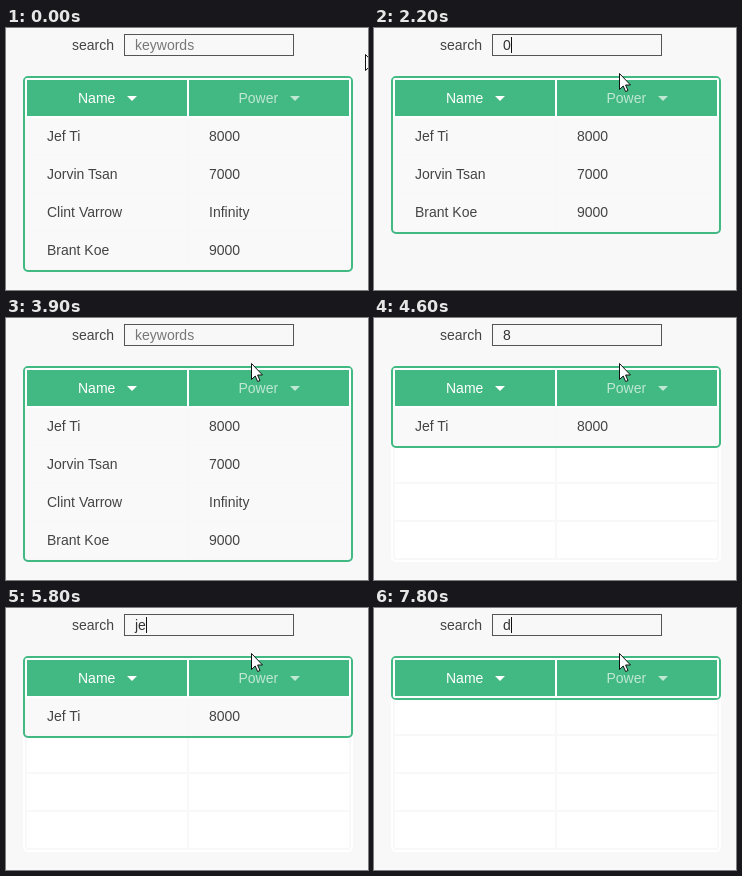
Animation of 362x262 px, one loop 8 s. Source, as an HTML page:

```html
<!DOCTYPE html>
<html lang="en">
<head>
<meta charset="utf-8">
<title>Searchable grid</title>
<style>
  html, body { margin: 0; width: 100%; height: 100%; overflow: hidden; background: #f8f8f8; }
  svg { display: block; font: 14px "Liberation Sans", Arial, sans-serif; fill: #444; }
</style>
</head>
<body>
<svg id="stage" width="362" height="262" viewBox="0 0 362 262"></svg>
<script>
const LOOP = 8000, GREEN = '#42b983', PAGE = '#f8f8f8';
const people = [
  ['Jef Ti', '8000'],
  ['Jorvin Tsan', '7000'],
  ['Clint Varrow', 'Infinity'],
  ['Brant Koe', '9000']
];

// start, typed text, caret x (0 = hidden), applied filter
const typing = [
  [0, '', 0, ''], [600, '', 129, ''], [1000, '', 0, ''], [1500, '', 129, ''], [2000, '', 0, ''],
  [2200, '0', 137, '0'], [2600, '00', 145, '0'], [2800, '000', 152, '0'],
  [3200, '00', 145, '0'], [3300, '0', 0, '0'], [3400, '', 129, ''], [3900, '', 0, ''],
  [4100, '8', 137, '8'], [4600, '8', 0, '8'], [4800, '', 129, ''], [5300, '', 0, ''],
  [5600, 'j', 132, ''], [5700, 'j', 132, 'j'], [5800, 'je', 140, 'je'], [6000, 'jef', 144, 'jef'],
  [6500, 'je', 140, 'je'], [6600, 'j', 132, 'je'], [6700, 'j', 0, 'j'],
  [6900, '', 129, ''], [7300, '', 0, ''], [7800, 'd', 137, 'd']
];

// start, x, y, shape
const pointer = [
  [0, 359, 26, 'arrow'], [100, 269, 8, 'beam'], [200, 247, 8, 'beam'], [400, 245, 8, 'beam'],
  [700, 245, 9, 'beam'], [800, 245, 31, 'arrow'], [900, 245, 40, 'arrow'], [1000, 245, 45, 'arrow']
];

const shapes = {
  arrow: '<path d="M.5 .5V16.5L4.2 13 6.6 18.5 9 17.5 6.6 12H11.5z" fill="#fff" stroke="#111"/>',
  beam: '<path d="M0 .5H3M4 .5H7M3.5 1V15M0 15.5H3M4 15.5H7" fill="none" stroke="#111"/>'
};

const at = (list, t) => list.filter(step => step[0] <= t).pop();
const rect = (x, y, w, h, fill, more = '') =>
  `<rect x="${x}" y="${y}" width="${w}" height="${h}" fill="${fill}" ${more}/>`;
const text = (x, y, s, more = '') => `<text x="${x}" y="${y}" ${more}>${s}</text>`;
const frame = (rows, color) =>
  rect(18, 49, 328, 42 + 38 * rows, PAGE, `rx="4" stroke="${color}" stroke-width="2"`);
const cells = (y, fill) => rect(21, y, 160, 36, fill) + rect(183, y, 160, 36, fill);
const rowTop = i => 90 + 38 * i;

function heading(x, label, arrowX, opacity) {
  return `<g fill="#fff" opacity="${opacity}">${text(x, 75, label)}
    <path d="M${arrowX} 68h10l-5 5z"/></g>`;
}

function search(typed, caret) {
  return text(66, 22, 'search') +
    rect(118.5, 6.5, 169, 21, PAGE, 'stroke="#555"') +
    text(129, 22, typed || 'keywords', `fill="${typed ? '#333' : '#777'}"`) +
    (caret ? rect(caret, 9, 1, 16, '#111') : '');
}

function grid(query, blanks) {
  const rows = people.filter(p => p.some(s => s.toLowerCase().includes(query)));
  let out = '';
  // cleared rows stay behind as white cells
  if (blanks && rows.length < people.length) {
    out += frame(people.length, '#fff');
    people.forEach((_, i) => out += cells(rowTop(i), '#fff'));
  }
  out += frame(rows.length, GREEN) + rect(19, 50, 326, 40, '#fff', 'rx="2"') + cells(52, GREEN);
  out += heading(72, 'Name', 121, 1) + heading(232.5, 'Power', 284, .66);
  rows.forEach(([name, power], i) => {
    const y = rowTop(i);
    out += cells(y, '#f9f9f9') + text(41, y + 23, name) + text(203, y + 23, power);
  });
  return out;
}

const stage = document.getElementById('stage');
let shown = '';

function draw(now) {
  const t = now % LOOP;
  const [, typed, caret, query] = at(typing, t);
  const [, x, y, shape] = at(pointer, t);
  const next = search(typed, caret) + grid(query, t >= 4100) +
    `<g transform="translate(${x} ${y})">${shapes[shape]}</g>`;
  if (next !== shown) stage.innerHTML = shown = next;
  requestAnimationFrame(draw);
}
draw(0);
</script>
</body>
</html>
```
